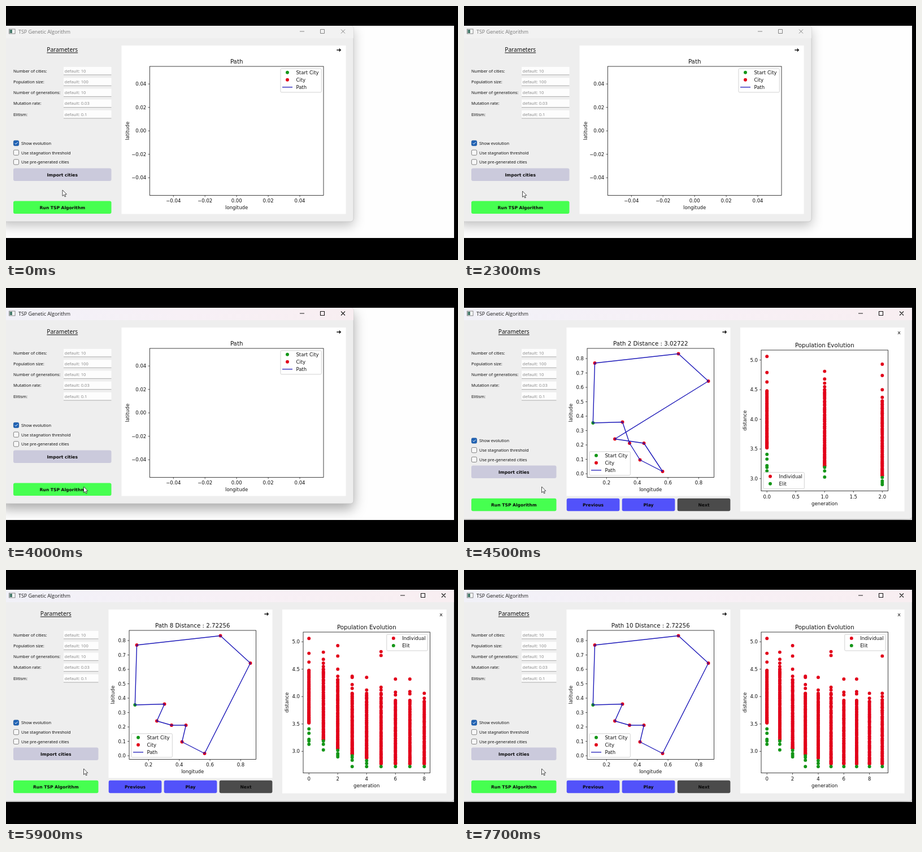
Write an HTML page that moves like this. It is 800 by 450 pixels and loops after 7800 ms.

```html
<!DOCTYPE html>
<html lang="en">
<head>
<meta charset="utf-8">
<title>TSP Genetic Algorithm</title>
<style>
  html, body { margin: 0; width: 100%; height: 100%; overflow: hidden; background: #000; }
  svg { display: block; }
  text { white-space: pre; }
  .plot { font: 8.53px "DejaVu Sans", sans-serif; fill: #111; }
  .head { font-size: 10.24px; }
  .ui { font: 7.4px "Noto Sans", sans-serif; fill: #111; }
  .hint { font: 7.6px "Noto Sans", sans-serif; fill: #8a8a8a; }
  .caption { font: 10.1px "Noto Sans", sans-serif; fill: #111; text-decoration: underline; }
  .bold { font: bold 7.6px "DejaVu Sans", sans-serif; fill: #080808; }
  .bar { font: 8.9px "Open Sans", sans-serif; }
  .mid { text-anchor: middle; }
  .end { text-anchor: end; }
</style>
</head>
<body>
<svg width="800" height="450" viewBox="0 0 800 450">
  <defs>
    <clipPath id="screen"><rect y="35" width="793" height="376"/></clipPath>
    <linearGradient id="active"><stop stop-color="#f1f1f8"/><stop offset=".5" stop-color="#f7f0f6"/><stop offset="1" stop-color="#f8eef1"/></linearGradient>
  </defs>
  <rect width="800" height="450"/>
  <g clip-path="url(#screen)">
    <rect y="35" width="793" height="376" fill="#fefefe"/>
    <g id="scene"></g>
    <path id="cursor" d="M0 0V10.6L2.5 8.4L4.1 12L5.8 11.3L4.2 7.8L7.3 7.5Z" fill="#fff" stroke="#222" stroke-width=".8" stroke-linejoin="round"/>
  </g>
</svg>
<script>
const LOOP = 7800, FOCUS = 3000;
const RED = '#e2001a', GREEN = '#149618', BLUE = '#1c18b8';
const genTimes = [4100, 4300, 4500, 4700, 4900, 5100, 5400, 5600, 5900, 6200];
const cursorKeys = [[0, 100, 326], [900, 100, 326], [2300, 103.5, 328], [2500, 103.5, 328], [2900, 137.5, 352]];

const cities = {
  S: [228.3, 239], A: [231.5, 133], B: [379.5, 116.5], C: [432.5, 165], D: [267, 267.5],
  E: [293, 275], F: [318.5, 275], G: [311.5, 304.5], H: [351.5, 325], I: [280.5, 237.5]
};
const routes = ['SABCDFGHEI', 'SABCDFHGEI', 'SABCFHGDEI', 'SABCHGFEDI'];
const lengths = ['3.12847', '3.02722', '2.90184', '2.72256'];

// per generation: outliers, top and bottom of the dense part, elite values
const population = [
  { out: [5.06, 4.79, 4.63], hi: 4.48, lo: 3.52, elite: [3.41, 3.33, 3.22, 3.19, 3.13] },
  { out: [4.81, 4.68, 4.61, 4.55], hi: 4.5, lo: 3.21, elite: [3.19, 3.13, 3.02722] },
  { out: [4.93, 4.74, 4.5, 4.37], hi: 4.31, lo: 3.05, elite: [3.02, 2.96, 2.93, 2.9] },
  { out: [4.37, 4.35, 4.22, 4.15], hi: 4.06, lo: 2.95, elite: [2.92, 2.89, 2.84, 2.72256] },
  { out: [4.35, 4.12, 4.06], hi: 4.03, lo: 2.88, elite: [2.83, 2.78, 2.72256] },
  { out: [4.82, 4.75, 4.17, 4.12], hi: 4.06, lo: 2.77, elite: [2.72256] },
  { out: [4.32, 4.08, 4.03], hi: 3.93, lo: 2.77, elite: [2.72256] },
  { out: [4.32, 4.09, 4.05], hi: 3.93, lo: 2.77, elite: [2.72256] },
  { out: [4.06, 3.97], hi: 3.91, lo: 2.77, elite: [2.72256] },
  { out: [4.74, 4.06, 4.0], hi: 3.94, lo: 2.77, elite: [2.72256] }
];
let seed = 7;
const random = () => (seed = (seed * 16807) % 2147483647) / 2147483647;
population.forEach((p, g) => {
  const n = g < 5 ? 76 : 58;
  p.all = [...p.out, p.hi, p.lo];
  for (let i = 0; i < n; i++) p.all.push(p.lo + (p.hi - p.lo) * ((i + random()) / n) ** (g < 5 ? 1.3 : 1.2));
});

const text = (x, y, s, cls, extra = '') => `<text x="${x}" y="${y}" class="${cls}" ${extra}>${s}</text>`;
const rect = (x, y, w, h, fill, extra = '') => `<rect x="${x}" y="${y}" width="${w}" height="${h}" fill="${fill}" ${extra}/>`;
const line = (d, color, width, extra = '') => `<path d="${d}" fill="none" stroke="${color}" stroke-width="${width}" ${extra}/>`;
const dot = (x, y, color) => `<circle cx="${x}" cy="${y}" r="2.95" fill="${color}"/>`;
const button = (x, y, w, label, fill) =>
  rect(x, y, w, 22.5, fill, 'rx="3"') + text(x + w / 2, y + 14.1, label, 'bold mid');

function ticks(lo, hi, bins) {
  const raw = (hi - lo) / bins, mag = 10 ** Math.floor(Math.log10(raw));
  const step = mag * [1, 2, 2.5, 5, 10].find(s => s * mag >= raw - 1e-9);
  let digits = 0;
  while (Math.abs(step * 10 ** digits - Math.round(step * 10 ** digits)) > 1e-6) digits++;
  const list = [];
  for (let k = Math.ceil(lo / step - 1e-6); k * step <= hi + 1e-9; k++)
    list.push([k * step, (k * step).toFixed(digits).replace('-', '−')]);
  return list;
}

function axes(o) {
  const { x, y, w, h, xlim, ylim } = o, bottom = y + h;
  const px = v => x + (v - xlim[0]) / (xlim[1] - xlim[0]) * w;
  const py = v => bottom - (v - ylim[0]) / (ylim[1] - ylim[0]) * h;
  let s = '', marks = '';
  for (const [v, label] of ticks(...xlim, o.bins)) {
    marks += `M${px(v)} ${bottom}v3`;
    s += text(px(v), bottom + 13, label, 'plot mid');
  }
  let widest = 0;
  for (const [v, label] of ticks(...ylim, 9)) {
    marks += `M${x} ${py(v)}h-3`;
    widest = Math.max(widest, label.length);
    s += text(x - 6, py(v) + 3.1, label, 'plot end');
  }
  const lx = x - 25.5 - (widest - 3) * 5.6, ly = y + h / 2;
  s += text(x + w / 2, y - 5.4, o.title, 'plot head mid');
  s += text(x + w / 2, bottom + 25, o.xlabel, 'plot mid');
  s += text(lx, ly, o.ylabel, 'plot mid', `transform="rotate(-90 ${lx} ${ly})"`);
  s += line(marks, '#111', .7);
  const frame = rect(x, y, w, h, 'none', 'stroke="#111" stroke-width=".8"');
  return { px, py, wrap: body => s + body + frame };
}

function legend(x, y, items) {
  let s = rect(x, y, 72.3, items.length * 13 + 3, '#fff', 'fill-opacity=".8" stroke="#ccc" stroke-width=".9" rx="1.7"');
  items.forEach(([label, color], i) => {
    const cy = y + 6.9 + 13 * i;
    s += label === 'Path' ? line(`M${x + 3} ${cy}h18`, color, 1.3) : dot(x + 12, cy, color);
    s += text(x + 27.4, cy + 3.1, label, 'plot');
  });
  return s;
}
const pathKey = [['Start City', GREEN], ['City', RED], ['Path', BLUE]];

function frameOf(right, bottom, focused) {
  const ink = focused ? '#1a1a1a' : '#777';
  const shadow = focused ? '0 9px 11px rgba(0,0,0,.34)' : '0 7px 10px rgba(0,0,0,.24)';
  return `<g style="filter:drop-shadow(${shadow})">` +
    rect(-10, 34.5, right + 10, bottom - 34.5, '#eee', 'rx="5" stroke="#bdbdbd" stroke-width=".6"') + '</g>' +
    `<path d="M0 35H${right - 5}q5 0 5 5V57H0Z" fill="${focused ? 'url(#active)' : '#f2f2f2'}"/>` +
    rect(5.5, 41, 10.5, 8, '#fff', 'stroke="#666" stroke-width=".8"') + rect(6.5, 42, 4.5, 6, '#477a6c') +
    text(22, 48.6, 'TSP Genetic Algorithm', 'bar', `fill="${ink}"`) +
    line(`M${right - 95} 45h8M${right - 58.5} 41.5h7v7h-7ZM${right - 22} 41.5l7 7m0 -7l-7 7`, ink, focused ? 1.1 : .9);
}

function panel(w, checkY, importY, runY) {
  let s = text(13 + w / 2, 81.4, 'Parameters', 'caption mid');
  [['Number of cities:', 10], ['Population size:', 100], ['Number of generations:', 10], ['Mutation rate:', .03], ['Elitism:', .1]]
    .forEach(([label, value], i) => {
      const y = 114.9 + 19.25 * i;
      s += text(13, y + 2.8, label, 'ui') + rect(102, y - 7, w - 89, 14, '#fdfdfd') +
        line(`M102 ${y + 7}h${w - 89}`, '#999', .8) + text(103.5, y + 2.8, 'default: ' + value, 'hint');
    });
  ['Show evolution', 'Use stagnation threshold', 'Use pre-generated cities'].forEach((label, i) => {
    const y = checkY + 16.7 * i;
    s += rect(13.4, y - 4.6, 9.2, 9.2, i ? '#f8f8f8' : '#1f62b4', `rx="2" stroke="${i ? '#666' : '#1b559c'}" stroke-width=".8"`);
    if (!i) s += line(`M15.6 ${y}l1.8 1.8l3.3 -3.6`, '#fff', 1);
    s += text(27, y + 2.8, label, 'ui');
  });
  return s + button(13, importY, w, 'Import cities', '#cbcadc') + button(13, runY, w, 'Run TSP Algorithm', '#46ff50');
}

const arrow = x => line(`M${x - 3.7} 78h6.5M${x + .7} 75.6l2.6 2.4l-2.6 2.4`, '#111', 1.3);

function startView(focused) {
  const ax = axes({ x: 254.3, y: 107, w: 307.7, h: 228.4, xlim: [-.055, .055], ylim: [-.055, .055], bins: 6,
    title: 'Path', xlabel: 'longitude', ylabel: 'latitude' });
  return frameOf(615, 382, focused) + panel(173.5, 243, 287.5, 345.5) + rect(204.5, 70, 397, 298.5, '#fff') +
    arrow(589) + ax.wrap(legend(486, 110.9, pathKey));
}

function pathPlot(n) {
  const k = Math.min(n, 4) - 1;
  const ax = axes({ x: 218, y: 107, w: 224.4, h: 228.4, xlim: [.0739, .8991], ylim: [-.0248, .8706], bins: 5,
    title: `Path ${n} Distance : ${lengths[k]}`, xlabel: 'longitude', ylabel: 'latitude' });
  const dots = Object.entries(cities).map(([name, p]) => dot(...p, name === 'S' ? GREEN : RED)).join('');
  const d = 'M' + [...routes[k]].map(c => cities[c].join(' ')).join('L') + 'Z';
  return ax.wrap(dots + line(d, BLUE, 1.4, 'stroke-linejoin="round"') + legend(222, 289.9, pathKey));
}

function evolutionPlot(last) {
  const shown = population.slice(0, last + 1), top = 5.06;
  const low = Math.min(...shown.flatMap(p => p.elite)), pad = (top - low) * .05;
  const ax = axes({ x: 526, y: 110, w: 224.5, h: 249.6, bins: 5,
    xlim: last ? [-.05 * last, 1.05 * last] : [-.055, .055], ylim: [low - pad, top + pad],
    title: 'Population Evolution', xlabel: 'generation', ylabel: 'distance' });
  const column = (list, g, color) => list.map(v => dot(ax.px(g).toFixed(1), ax.py(v).toFixed(1), color)).join('');
  const body = shown.map((p, g) => column(p.all, g, RED)).join('') + shown.map((p, g) => column(p.elite, g, GREEN)).join('');
  const corner = last === 2 ? [530, 326.8] : [673.8, 114];
  return ax.wrap(body + legend(...corner, [['Individual', RED], ['Elit', GREEN]]));
}

function resultView(gen, path) {
  return frameOf(793, 409.5, true) + panel(150.5, 270.5, 314.5, 372.8) +
    rect(181.5, 70, 290, 298.5, '#fff') + rect(489, 70, 290.5, 325.7, '#fff') +
    arrow(461) + text(770, 82, 'x', 'plot mid', 'style="font-size:9.5px"') + pathPlot(path) + evolutionPlot(gen) +
    button(181.7, 372.8, 93.7, 'Previous', '#5252fa') + button(279.7, 372.8, 93.7, 'Play', '#5252fa') +
    button(377.7, 372.8, 93.7, 'Next', '#4b4b4b');
}

function cursorAt(t) {
  const i = cursorKeys.findIndex(k => k[0] > t);
  if (i < 0) return cursorKeys[cursorKeys.length - 1].slice(1);
  const [a, b] = [cursorKeys[i - 1], cursorKeys[i]];
  let u = (t - a[0]) / (b[0] - a[0]);
  u = u * u * (3 - 2 * u);
  return [a[1] + (b[1] - a[1]) * u, a[2] + (b[2] - a[2]) * u];
}

const scene = document.getElementById('scene'), cursor = document.getElementById('cursor');
let current = '';
function draw() {
  const t = Math.floor(performance.now() % LOOP / 100) * 100;
  const gen = genTimes.filter(g => g <= t).length - 1;
  const path = Math.max(1, genTimes.filter(g => g + 100 <= t).length);
  const focused = t >= FOCUS, key = [gen, path, focused].join();
  if (key !== current) {
    current = key;
    scene.innerHTML = gen < 0 ? startView(focused) : resultView(gen, path);
  }
  cursor.setAttribute('transform', `translate(${cursorAt(t)})`);
  requestAnimationFrame(draw);
}
draw();
</script>
</body>
</html>
```
